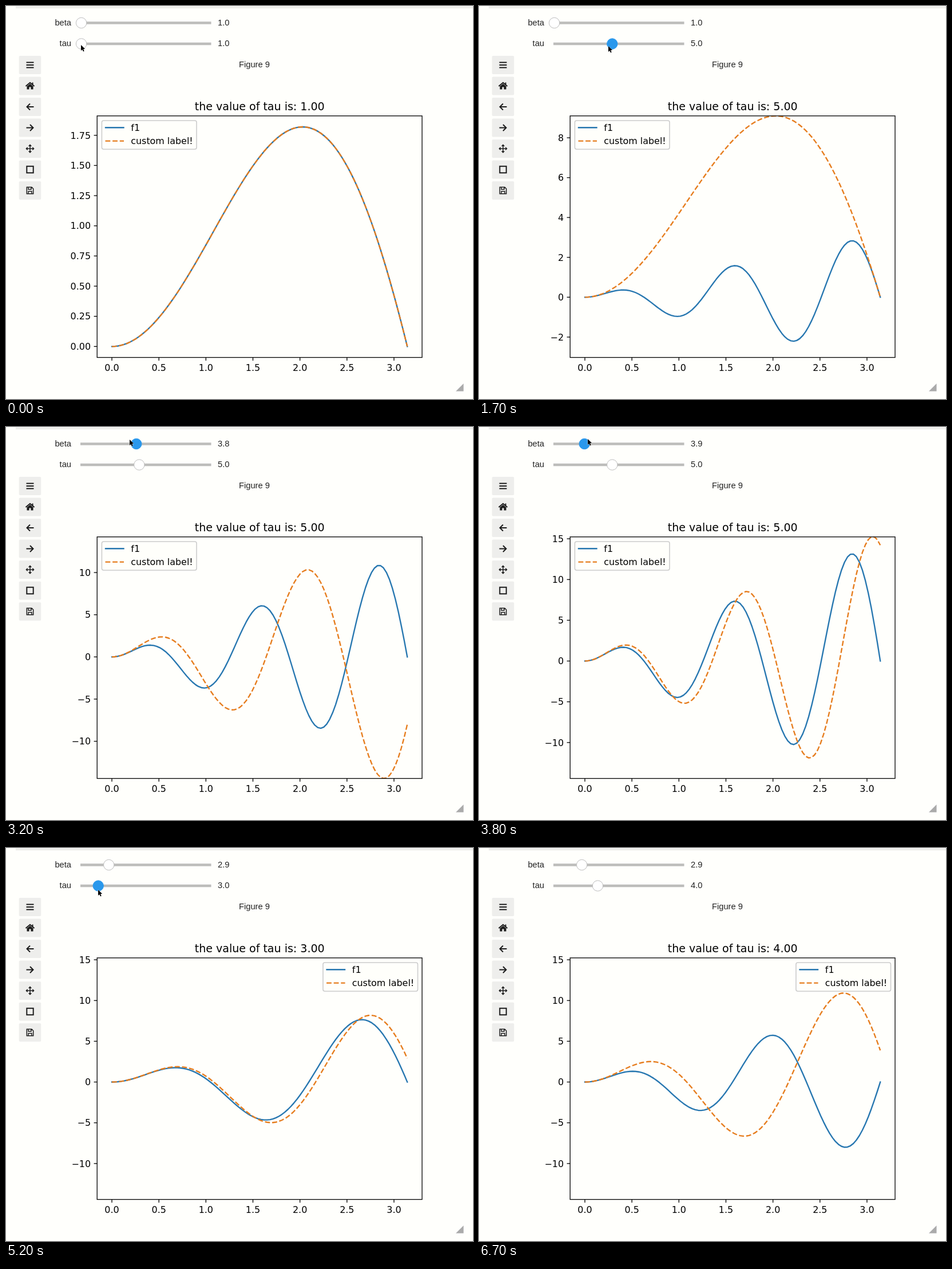
Write an HTML page that moves like this. It is 816x686 px and loops after 6.9 s.

```html
<!DOCTYPE html>
<html lang="en">
<head>
<meta charset="utf-8">
<title>Interactive plot</title>
<style>
  html, body { margin: 0; width: 100%; height: 100%; overflow: hidden; background: #fffffc; }
  svg { display: block; width: 816px; height: 686px; }
  .ui { font: 14.7px "Liberation Sans", Arial, sans-serif; fill: #222; }
  .plot { font: 15.9px "DejaVu Sans", sans-serif; fill: #000; }
  .title { font-size: 19.05px; }
  .end { text-anchor: end; }
  .mid { text-anchor: middle; }
  .axis { fill: none; stroke: #000; stroke-width: 1.3; }
  .line { fill: none; stroke-width: 2.38; stroke-linejoin: round; }
  .blue { stroke: #2777b0; stroke-linecap: square; }
  .orange { stroke: #e67d1e; stroke-dasharray: 8.81 3.81; }
  .knob { fill: #fff; stroke: #bdbdbd; }
  .knob.active { fill: #2a98ec; stroke: #2a98ec; }
  .icon { fill: none; stroke: #1c1c1c; stroke-width: 2; }
</style>
</head>
<body>
<svg viewBox="0 0 816 686">
  <defs>
    <clipPath id="area"><rect x="159.2" y="191.8" width="568" height="421.7"/></clipPath>
  </defs>
  <rect width="816" height="686" fill="#fffffc"/>
  <path d="M17 0H816V3H17Z" fill="#f4f4f2"/>
  <path d="M17 3.2H816" stroke="#dededc"/>

  <g id="tools"></g>
  <g id="sliders"></g>
  <text class="ui mid" x="434" y="107">Figure 9</text>

  <g class="plot">
    <text class="title mid" id="title" x="443.2" y="182"></text>
    <g id="xTicks"></g>
    <g id="yTicks"></g>
    <g clip-path="url(#area)">
      <path class="line blue" id="f1"/>
      <path class="line orange" id="f2"/>
    </g>
    <rect class="axis" x="159.2" y="191.8" width="567.8" height="421.7"/>
    <g id="legend">
      <rect x="167.4" y="200" width="165.6" height="50" rx="3.2" fill="#fffffc" fill-opacity=".8" stroke="#ccc" stroke-width="1.6"/>
      <path class="line blue" d="M174 212.3H205.500"/>
      <path class="line orange" d="M173.500 235.600H206"/>
      <text x="218.300" y="218">f1</text>
      <text x="218.300" y="241">custom label!</text>
    </g>
  </g>

  <path d="M799.500 659V672.500H786Z" fill="#aaa"/>
  <path id="cursor" d="M0 0V10L2.300 8 4 11.600 5.700 10.800 4.100 7.300 7.100 7.100Z" fill="#000" stroke="#fff" stroke-width=".8" paint-order="stroke"/>
</svg>
<script>
const LOOP = 6900, STEP = 100;
const AXES = { left: 159.2, right: 727, top: 191.8, bottom: 613.5 };
const LEGEND_SHIFT = 386.5;
const $ = id => document.getElementById(id);

// Handle positions of the two sliders, one value per tick of the drag
const drags = {
  tau: [
    { from: 5, values: [1.12, 1.36, 2.1, 2.82, 3.25, 3.65, 4.1, 4.5, 4.8, 4.95, 5] },
    { from: 47, values: [4.5, 3.55, 3, 3, 2.17, 2.9, 3.8, 4] }
  ],
  beta: [
    { from: 25, values: [1.1, 1.9, 2.78, 3.1, 3.3, 3.83, 3.83, 4.8, 5.1, 5.2, 4.95, 4.64, 3.88, 3.08, 2.78, 2.9] }
  ]
};
const stalls = [41, 53, 57];
const tickAt = frame => frame - stalls.filter(s => s <= frame).length;

function valueAt(name, tick) {
  let value = 1;
  for (const { from, values } of drags[name])
    if (tick >= from) value = values[Math.min(tick - from, values.length - 1)];
  return value;
}

// Pointer path: frame, x, y
const pointer = [
  [0, 131, 68], [5, 132, 68], [6, 138, 67], [8, 168, 66], [10, 196, 67], [13, 221, 69],
  [17, 226, 70], [18, 178, 62], [19, 178, 62], [21, 138, 32], [22, 120, 26], [23, 128, 22],
  [24, 128, 22], [27, 164, 22], [30, 192, 22], [32, 216, 22], [34, 235, 22], [36, 221, 21],
  [38, 190, 21], [39, 180, 22], [41, 180, 22], [43, 185, 32], [44, 202, 52], [46, 202, 52],
  [47, 230, 70], [50, 180, 72], [52, 161, 73], [53, 161, 73], [56, 204, 70], [58, 204, 70],
  [61, 100, 49], [62, 100, 49], [63, 70, 14]
];
function pointerAt(frame) {
  const next = pointer.findIndex(p => p[0] >= frame);
  if (next < 0) return null;
  const b = pointer[next], a = pointer[Math.max(next - 1, 0)];
  const k = b[0] === a[0] ? 1 : (frame - a[0]) / (b[0] - a[0]);
  return [a[1] + k * (b[1] - a[1]), a[2] + k * (b[2] - a[2])];
}

const xs = Array.from({ length: 100 }, (_, i) => i / 99 * Math.PI);
const curves = (tau, beta) => [
  xs.map(x => beta * x * Math.sin(tau * x)),
  xs.map(x => tau * x * Math.sin(beta * x))
];
const margin = (AXES.right - AXES.left) / 22;
const px = x => AXES.left + margin + x / Math.PI * (AXES.right - AXES.left - 2 * margin);

// The y limits only ever grow, so they are accumulated over the loop
const limits = [];
let low = -0.091, high = 1.911;
for (let tick = 0; tick < LOOP / STEP; tick++) {
  const all = curves(valueAt('tau', tick - 2), valueAt('beta', tick - 2)).flat();
  low = Math.min(low, ...all);
  high = Math.max(high, ...all);
  limits.push([low, high]);
}

function yTicks(lo, hi, py) {
  const raw = (hi - lo) / 9, power = 10 ** Math.floor(Math.log10(raw));
  const step = [1, 2, 2.5, 5, 10].find(s => s * power >= raw) * power;
  const digits = [0, 1, 2].find(d => Math.abs(step - step.toFixed(d)) < 1e-9);
  let out = '';
  for (let i = Math.ceil(lo / step); i * step <= hi; i++) {
    const y = py(i * step), label = (i * step).toFixed(digits).replace('-', '\u2212');
    out += `<path class="axis" d="M${AXES.left} ${y}h-5.6"/><text class="end" x="148" y="${y + 5.8}">${label}</text>`;
  }
  return out;
}

const toPoints = (ys, py) => ys.map((y, i) => [px(xs[i]), py(y)]);
const toPath = points => 'M' + points.map(p => p.map(v => v.toFixed(2)).join(' ')).join('L');
const hitsRightLegend = points => points.some(([x, y]) => x > 553.9 && x < 719.5 && y > 200 && y < 250);

function drawStatic() {
  const icons = [
    'M-6.500-4.500H6.500M-6.500 0H6.500M-6.500 4.500H6.500',
    'M-7.500 .5L0-5.800 7.500 .5M4.500-6V-2',
    'M6.500 0H-5M0-5.500L-5.500 0 0 5.500',
    'M-6.500 0H5M0-5.500L5.500 0 0 5.500',
    'M-6 0H6M0-6V6M-2.300-4.300L0-6.600 2.300-4.300M-2.300 4.300L0 6.600 2.300 4.300M-4.300-2.300L-6.600 0-4.300 2.300M4.300-2.300L6.600 0 4.300 2.300',
    'M-5.700-5.700H5.700V5.700H-5.700Z',
    'M-5.700-5.700H3L5.700-3V5.700H-5.700ZM-3-5.500V-2H2V-5.500M-3 5.500V1.500H3V5.500'
  ];
  $('tools').innerHTML = icons.map((d, i) => `<g transform="translate(42 ${103 + i * 36.5})">
    <rect x="-19.300" y="-16" width="38.600" height="32" rx="2" fill="#eeeeec"/>
    ${i === 1 ? '<path d="M-5.500 .8L0-3.800 5.500 .8V6H1.500V2H-1.500V6H-5.500Z" fill="#1c1c1c"/>' : ''}
    <path class="icon" d="${d}" ${i === 4 || i > 5 ? 'style="stroke-width:1.5"' : ''}/></g>`).join('');

  $('sliders').innerHTML = ['beta', 'tau'].map((name, i) => {
    const y = 29.5 + i * 36.5;
    return `<text class="ui end" x="114" y="${y + 4}">${name}</text>
      <path d="M130 ${y}H358.500" stroke="#bdbdbb" stroke-width="4.500"/>
      <circle class="knob" id="${name}Knob" cy="${y}" r="9.200"/>
      <text class="ui" id="${name}Value" x="370" y="${y + 4}"></text>`;
  }).join('');

  for (let i = 0; i < 7; i++) {
    const x = px(i / 2);
    $('xTicks').innerHTML += `<path class="axis" d="M${x} ${AXES.bottom}v5.600"/><text class="mid" x="${x}" y="637">${(i / 2).toFixed(1)}</text>`;
  }
}

function drawFrame(frame) {
  const tick = tickAt(frame);
  const active = {
    tau: (frame >= 1 && frame < 25) || (frame >= 47 && frame < 67),
    beta: frame >= 23 && frame < 47
  };
  for (const name of ['tau', 'beta']) {
    const knob = $(name + 'Knob');
    knob.setAttribute('cx', 131.6 + (valueAt(name, tick) - 1) * 25.3);
    knob.classList.toggle('active', active[name]);
    $(name + 'Value').textContent = valueAt(name, tick - 1).toFixed(1);
  }

  const tau = valueAt('tau', tick - 2), beta = valueAt('beta', tick - 2);
  const [lo, hi] = limits[tick];
  const py = y => AXES.top + (hi - y) / (hi - lo) * (AXES.bottom - AXES.top);
  const lines = curves(tau, beta).map(ys => toPoints(ys, py));
  $('f1').setAttribute('d', toPath(lines[0]));
  $('f2').setAttribute('d', toPath(lines[1]));
  $('title').textContent = `the value of tau is: ${tau.toFixed(2)}`;
  $('yTicks').innerHTML = yTicks(lo, hi, py);
  $('legend').setAttribute('transform', `translate(${lines.some(hitsRightLegend) ? 0 : LEGEND_SHIFT})`);

  const at = pointerAt(frame);
  $('cursor').style.display = at ? '' : 'none';
  if (at) $('cursor').setAttribute('transform', `translate(${at})`);
}

let shown = -1;
function animate() {
  const frame = Math.floor(performance.now() % LOOP / STEP);
  if (frame !== shown) drawFrame(shown = frame);
  requestAnimationFrame(animate);
}
drawStatic();
animate();
</script>
</body>
</html>
```
